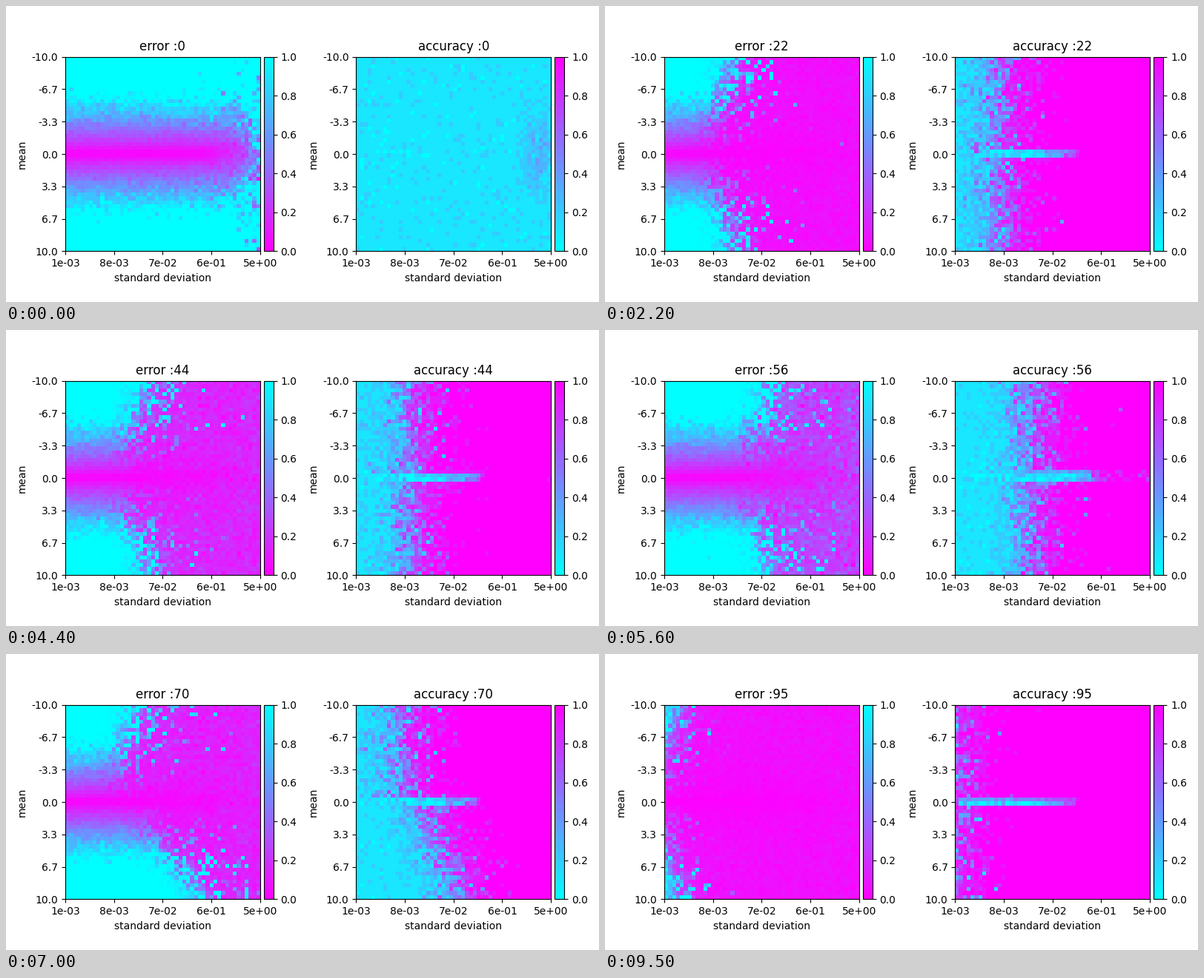
Animation of 800 by 400 pixels, one loop 9.6 s. Source, as a matplotlib script:

```python
import numpy as np
import matplotlib.pyplot as plt
from matplotlib.animation import FuncAnimation
from mpl_toolkits.axes_grid1 import make_axes_locatable

FRAMES, INTERVAL = 96, 100
N = 50

# Column up to which networks are still untrained, at a few steps.
EDGE_STEPS = [0, 3, 13, 31, 56, 70, 84, 95]
EDGE_COLS = [80, 40, 14.5, 8, 19.5, 12, 5.5, -1.5]

col = np.arange(N)[None, :] * np.ones((N, 1))
mean = np.linspace(-10, 10, N)[:, None] * np.ones((1, N))
dist = np.abs(mean)
sigma = 1e-3 * 5000 ** (col / (N - 1))
fixed = np.random.default_rng(7).normal(size=(5, N, N))


def sigmoid(x):
    return 1 / (1 + np.exp(-np.clip(x, -50, 50)))


def bump(n, center, width):
    return np.exp(-((n - center) / width) ** 2)


def cell_noise(n):
    """Mostly fixed per cell, partly new on every step."""
    fresh = np.random.default_rng(100 + n).normal(size=fixed.shape)
    return .88 * fixed + .48 * fresh


def untrained_edge(n):
    tilt = np.where(mean > 0, .5 + mean / 10, 0)
    return np.interp(n, EDGE_STEPS, EDGE_COLS) + 10 * bump(n, 70, 5) * tilt


def error_map(n, edge, z, tail):
    start = .17 * np.hypot(dist, .75 * sigma)
    start *= 1 + (.1 + .06 * sigma) * z[2]

    outward = np.clip((dist - 3) / 7, 0, 1)
    limit = edge * (1 + .1 * outward) - 2 + 5 * outward
    spread = 3.3 + .16 * np.clip(edge, 0, 20)
    learned = sigmoid((col - limit - spread * tail) / 1.6)

    dip = .9 * np.exp(-dist / 2.5) * (1 - (col / N) ** 3)
    rest = (.06 + .2 * bump(n, 56, 14)) * (1 - dip) * (1 + .3 * z[2])
    return np.clip(np.clip(start, 0, 1) * (1 - learned) + rest * learned, 0, 1)


def accuracy_map(n, edge, z, tail):
    guess = .105 + .033 * z[3]
    guess += .2 * np.exp(-((col - 46) / 4) ** 2 - (mean / 3.5) ** 2) * (1 + .4 * z[2])
    learned = sigmoid((col - edge - 2.6 * z[4] - 2.8 * (tail - 1)) / 2.8)
    acc = guess + (1 - guess) * learned

    # Weights centred on zero break symmetry late.
    wide = bump(n, 56, 10)
    begin, end = 26 * bump(n, 31, 8), 31 + 4 * wide
    c = col[0]
    upper = .1 + .35 * sigmoid((n - 77) / 2)
    for row, low in ((23, 1 - .6 * wide), (24, upper), (25, .1)):
        rise = .4 * (1 - wide) * np.clip((c - 18) / 10, 0, 1)
        rise += sigmoid((c - end) / 1.1) + .12 * z[3][row]
        cap = low + (1 - low) * rise
        acc[row] = np.where(c < begin, acc[row], np.minimum(acc[row], cap))
    return np.clip(np.round(acc, 1), 0, 1)


def maps(n):
    z = cell_noise(n)
    tail = (z[0] ** 2 + z[1] ** 2) / 2
    edge = untrained_edge(n)
    return error_map(n, edge, z, tail), accuracy_map(n, edge, z, tail)


def add_panel(ax, cmap):
    im = ax.imshow(np.zeros((N, N)), cmap=cmap, vmin=0, vmax=1,
                   interpolation="nearest")
    ax.set_xticks(np.linspace(-.5, N - .5, 5),
                  [f"{v:.0e}" for v in np.geomspace(1e-3, 5, 5)])
    ax.set_yticks(np.linspace(-.5, N - .5, 7),
                  [f"{v:.1f}" for v in np.linspace(-10, 10, 7)])
    ax.set_xlabel("standard deviation")
    ax.set_ylabel("mean")
    cax = make_axes_locatable(ax).append_axes("right", size="5%", pad=.05)
    fig.colorbar(im, cax=cax)
    return im, ax.set_title("")


fig, (left, right) = plt.subplots(1, 2, figsize=(8, 4), dpi=100)
panels = [("error", *add_panel(left, "cool_r")),
          ("accuracy", *add_panel(right, "cool"))]
fig.tight_layout()
fig.subplots_adjust(bottom=.1, top=.9)


def update(n):
    for (name, im, title), data in zip(panels, maps(n)):
        im.set_data(data)
        title.set_text(f"{name} :{n}")
    return []


anim = FuncAnimation(fig, update, frames=FRAMES, interval=INTERVAL,
                     repeat=True, repeat_delay=0, blit=False)
plt.show()
```
